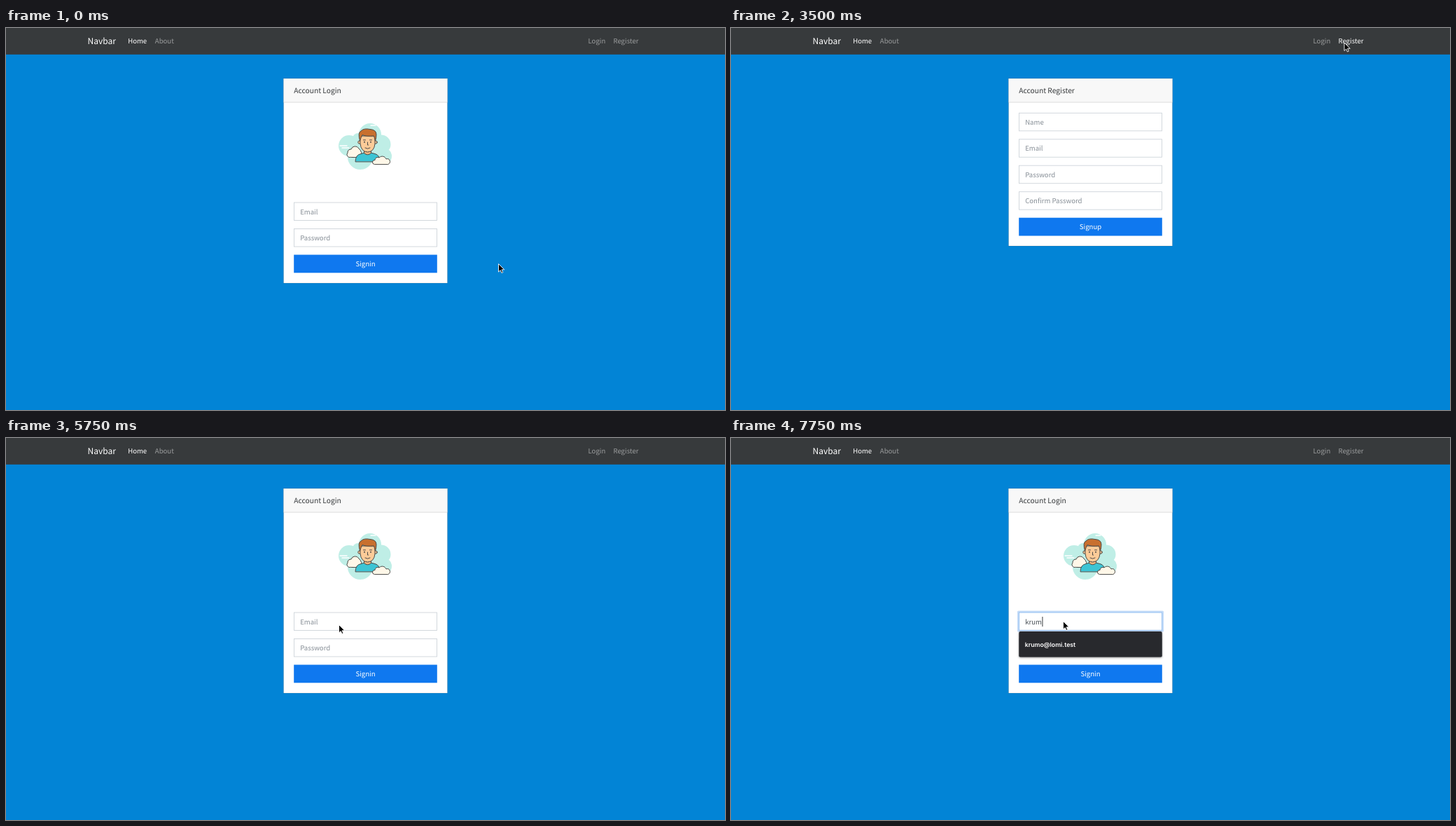
An HTML page that plays this animation: 1027x545 px, repeating every 8 s.

```html
<!DOCTYPE html>
<html lang="en">
<head>
<meta charset="utf-8">
<title>Account forms</title>
<style>
html, body { margin: 0; width: 100%; height: 100%; overflow: hidden; background: #0284d6; }
svg { display: block; width: 100%; height: 100%; }
text { font: 9.6px "Noto Sans CJK JP", "Noto Sans CJK SC", "Noto Sans CJK", sans-serif; text-rendering: geometricPrecision; }
.brand { font-size: 12px; fill: #fff; }
.link { fill: #9b9d9e; }
.link.on { fill: #fff; }
.title { font-size: 10.25px; fill: #373a3c; }
.hint { fill: #868e96; }
.field { fill: #fff; stroke: #ced4da; stroke-width: .9; }
.button { fill: #0f78ef; }
.label { fill: #fff; text-anchor: middle; }
.typed { fill: #495057; }
.mail { font: 600 8.75px Inter, sans-serif; fill: #fff; }
.menu { fill: #28292d; filter: drop-shadow(0 1px 1.5px #0006); }
.ink { stroke: #4b4a48; stroke-width: 1; stroke-linejoin: round; stroke-linecap: round; }
</style>
</head>
<body>
<svg viewBox="0 0 1027 545">
  <rect width="1027" height="545" fill="#0284d6"/>
  <rect width="1027" height="37.8" fill="#373a3c"/>
  <text class="brand" x="116.6" y="23">Navbar</text>
  <text class="link on" x="174.2" y="22">Home</text>
  <text class="link" x="212.8" y="22">About</text>
  <text class="link" id="loginLink" x="831.5" y="22">Login</text>
  <text class="link" id="registerLink" x="867.4" y="22">Register</text>

  <g id="login"></g>
  <g id="register"></g>

  <g id="avatar">
    <g fill="#bfeee6">
      <circle cx="520" cy="152" r="16"/>
      <circle cx="490" cy="168" r="15"/>
      <circle cx="536" cy="166" r="13.5"/>
      <circle cx="506" cy="184" r="18"/>
      <circle cx="539" cy="183" r="12"/>
      <rect x="495" y="150" width="40" height="42" rx="8"/>
    </g>
    <path d="M477 168H487M480 171H490M521 139H528" stroke="#fff" stroke-width="1.3" stroke-linecap="round"/>
    <path class="ink" fill="#fff7e8" d="M492 184.500A4 4 0 0 1 488 178A4.500 4.500 0 0 1 493 173A6 6 0 0 1 504 172Q509 176 508 184.500Z"/>
    <path class="ink" fill="#3dc4d4" d="M499 190.500Q499 181 507 179.500L512 178H521L527 179.500Q534 181 534 190.500Z"/>
    <path class="ink" fill="#f3b681" d="M511.500 174V178.500Q516.500 183 521.500 178.500V174Z"/>
    <g class="ink" fill="#fdcb98">
      <circle cx="505" cy="163" r="2.200"/>
      <circle cx="528" cy="163" r="2.200"/>
      <path d="M506 154H527V165Q526 176.500 516.500 177Q507 176.500 506 165Z"/>
    </g>
    <path class="ink" fill="#c8702f" d="M505.500 161Q502 149 507 147Q511 142.500 520 144.500Q529 145 529 152Q529 157 527.500 161L525.500 154Q514 155 509 152.500Q507 156 505.500 161Z"/>
    <path class="ink" fill="none" d="M510.500 159.800H513.500M519.500 159.800H522.500M516.500 163V167H517.500M513 171Q516.500 173.500 520 171"/>
    <circle cx="512" cy="162.800" r="1" fill="#4b4a48"/>
    <circle cx="521" cy="162.800" r="1" fill="#4b4a48"/>
    <path class="ink" fill="#fff7e8" d="M526 194.500A3 3 0 0 1 527 188.500A4 4 0 0 1 533 185A6 6 0 0 1 543 187A4 4 0 0 1 546 194.500Z"/>
  </g>

  <g id="focus">
    <rect x="410.200" y="247.800" width="206.600" height="27.600" rx=".5" fill="#fff" stroke="#c3dbf8" stroke-width="2.600"/>
    <rect class="field" x="411.500" y="249" width="204" height="25.300" style="stroke:#8fbcf0"/>
    <text id="emailHint" class="hint" x="420.200" y="265.700">Email</text>
    <text id="typed" class="typed" x="420.200" y="265.700"></text>
    <rect id="caret" y="255" width="1" height="14" fill="#33373a"/>
    <rect id="menu" class="menu" x="411.300" y="276" width="204.400" rx="2"/>
    <g id="mails"></g>
  </g>

  <path id="cursor" d="M0 0V11.500L2.700 9L4.400 12.900L6.300 12.100L4.600 8.300H8.300Z" fill="#000" stroke="#fff" stroke-width=".9" stroke-linejoin="round"/>
</svg>
<script>
const STEP = 250, LOOP = 8000;
const el = id => document.getElementById(id);
const show = (id, on) => el(id).style.display = on ? "" : "none";

function card(id, title, bottom, fields, firstY, action) {
  const buttonY = firstY + fields.length * 37.45;
  const inputs = fields.map((name, i) => {
    const y = firstY + i * 37.45;
    return `<rect class="field" x="411.500" y="${y}" width="204" height="25.500"/>
      <text class="hint" x="420.200" y="${y + 16.7}">${name}</text>`;
  }).join("");
  el(id).innerHTML = `
    <rect x="396.500" y="72" width="234" height="${bottom - 72}" fill="#fff"/>
    <rect x="396.500" y="72" width="234" height="34" fill="#f8f8f8"/>
    <path d="M396.500 106H630.500" stroke="#d9d9d9" stroke-width=".9"/>
    <rect x="396.500" y="72" width="234" height="${bottom - 72}" fill="none" stroke="#0003" stroke-width=".7"/>
    <text class="title" x="411.300" y="93">${title}</text>
    ${inputs}
    <rect class="button" x="411.200" y="${buttonY - .4}" width="204.600" height="25.800"/>
    <text class="label" x="513.500" y="${buttonY + 16.3}">${action}</text>`;
}
card("login", "Account Login", 364, ["Email", "Password"], 249, "Signin");
card("register", "Account Register", 311, ["Name", "Email", "Password", "Confirm Password"], 121.3, "Signup");

const mails = ["k@lomi.test", "krumo@lomi.test", "ubo@lomi.test", "korru5172@vertomi.test",
  "ko@lomi.test", "korvel.rumotesna@plomi.test"];

// Pointer path: time, x, y
const path = [
  [0, 703.5, 336.5], [500, 705, 330], [1250, 735, 243], [1500, 800, 90], [1750, 839.5, 13.5],
  [2000, 846, 15], [2250, 872, 20], [2750, 876, 24], [3000, 872, 31], [3250, 876, 21],
  [3750, 876, 21], [4500, 829, 36.5], [4750, 842, 20], [5000, 842, 20], [5250, 810, 52],
  [5750, 475.5, 266.5], [6000, 474.5, 261.5], [LOOP, 474.5, 261.5]
];

function pointer(t) {
  const i = path.findIndex(p => p[0] > t);
  const [t0, x0, y0] = path[i - 1], [t1, x1, y1] = path[i];
  const k = (t - t0) / (t1 - t0);
  return [x0 + (x1 - x0) * k, y0 + (y1 - y0) * k];
}

function draw(now) {
  const t = Math.floor(now % LOOP / STEP) * STEP;
  const within = (a, b) => t >= a && t < b;
  const registering = within(3500, 5000);
  show("register", registering);
  show("login", !registering);
  show("avatar", !registering);
  el("loginLink").classList.toggle("on", within(2000, 2250) || within(4750, 5250));
  el("registerLink").classList.toggle("on", within(2250, 4000));

  const text = t < 7500 ? "" : t < 7750 ? "kr" : "krum";
  const found = mails.filter(m => m.startsWith(text));
  show("focus", t >= 6250);
  show("emailHint", !text);
  show("caret", !within(6500, 7000));
  el("typed").textContent = text;
  el("caret").setAttribute("x", 420.7 + (text ? el("typed").getComputedTextLength() : 0));
  el("menu").setAttribute("height", 36.6 + (found.length - 1) * 25.7);
  el("mails").innerHTML = found.map((m, i) =>
    `<text class="mail" x="419.800" y="${297.8 + i * 25.7}">${m}</text>`).join("");

  el("cursor").setAttribute("transform", `translate(${pointer(t)})`);
}

const start = performance.now();
function tick() {
  draw(performance.now() - start);
  requestAnimationFrame(tick);
}
tick();
</script>
</body>
</html>
```
